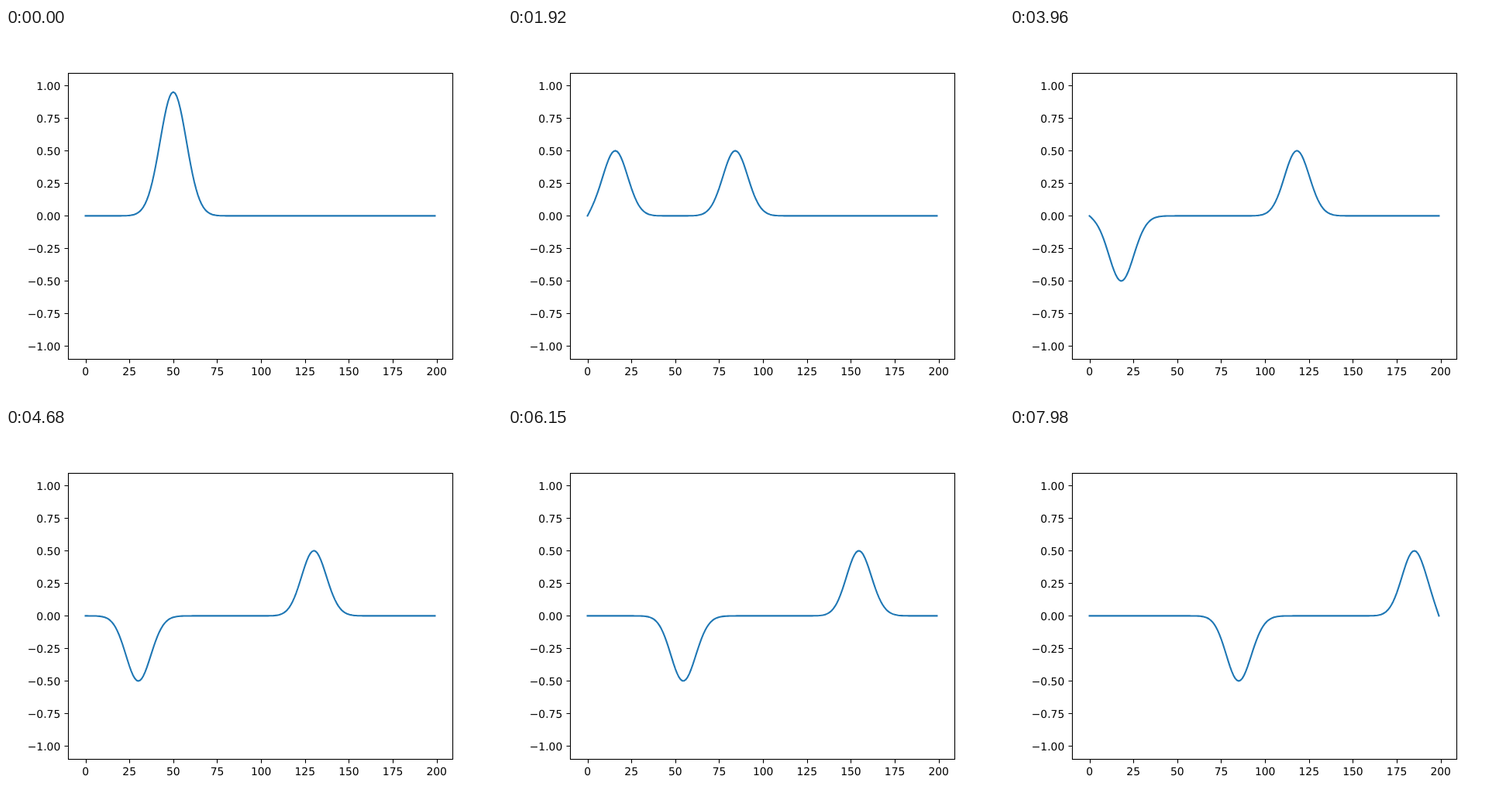
Recreate the animation shown at these times as an HTML page. Size 640 by 480 pixels, loop 8 s.

```html
<!DOCTYPE html>
<html lang="en">
<head>
<meta charset="utf-8">
<title>Wave on a string</title>
<style>
  html, body { margin: 0; width: 100%; height: 100%; overflow: hidden; background: #fff; }
  svg { display: block; width: 640px; height: 480px; }
  text { font: 13.889px "DejaVu Sans", sans-serif; text-rendering: geometricPrecision; }
  .axes { fill: none; stroke: #000; stroke-width: 1.111; }
  .wave { fill: none; stroke: #1f77b4; stroke-width: 2.083; stroke-linejoin: round; stroke-linecap: square; }
</style>
</head>
<body>
<svg viewBox="0 0 640 480">
  <g id="labels"></g>
  <path id="wave" class="wave"/>
  <path id="ticks" class="axes"/>
  <rect class="axes" x="80.5" y="58.5" width="496" height="369"/>
</svg>
<script>
const LOOP = 8000, STEP = 30, FRAMES = 267;
const POINTS = 200, WARMUP = 5, COURANT2 = 0.25;

const toX = x => 80 + (x + 9.95) * 496 / 218.9;
const toY = u => 242.4 - 168 * u;
const byId = id => document.getElementById(id);

function addLabel(text, x, y, anchor) {
  const el = document.createElementNS("http://www.w3.org/2000/svg", "text");
  el.setAttribute("x", x);
  el.setAttribute("y", y);
  el.setAttribute("text-anchor", anchor);
  el.textContent = text;
  byId("labels").append(el);
}

function drawAxes() {
  let ticks = "";
  for (let v = 0; v <= 200; v += 25) {
    ticks += `M${Math.round(toX(v)) + 0.5} 427.5v5`;
    addLabel(v, toX(v), 448, "middle");
  }
  for (let v = -1; v <= 1; v += 0.25) {
    const y = Math.round(toY(v));
    ticks += `M75.5 ${y + 0.5}h5`;
    addLabel(v.toFixed(2).replace("-", "\u2212"), 70.28, y + 6, "end");
  }
  byId("ticks").setAttribute("d", ticks);
}

// Leapfrog wave equation, ends held at zero, released from rest.
function simulate() {
  const states = [];
  let prev = Array.from({ length: POINTS }, (_, i) => Math.exp(-((i - 50) ** 2) / 100));
  prev[0] = prev[POINTS - 1] = 0;
  let cur = prev;
  for (let n = 1; n < WARMUP + FRAMES; n++) {
    if (n >= WARMUP) states.push(cur);
    const next = cur.map((u, i) => i === 0 || i === POINTS - 1 ? 0
      : 2 * u - prev[i] + COURANT2 * (cur[i - 1] - 2 * u + cur[i + 1]));
    prev = cur;
    cur = next;
  }
  return states;
}

const states = simulate();

function render(time) {
  const index = Math.min(FRAMES - 1, Math.floor((time % LOOP) / STEP));
  const points = states[index].map((u, i) => `${toX(i).toFixed(2)} ${toY(u).toFixed(2)}`);
  byId("wave").setAttribute("d", "M" + points.join("L"));
}

drawAxes();
render(0);
const start = performance.now();
function tick() {
  render(performance.now() - start);
  requestAnimationFrame(tick);
}
requestAnimationFrame(tick);
</script>
</body>
</html>
```
